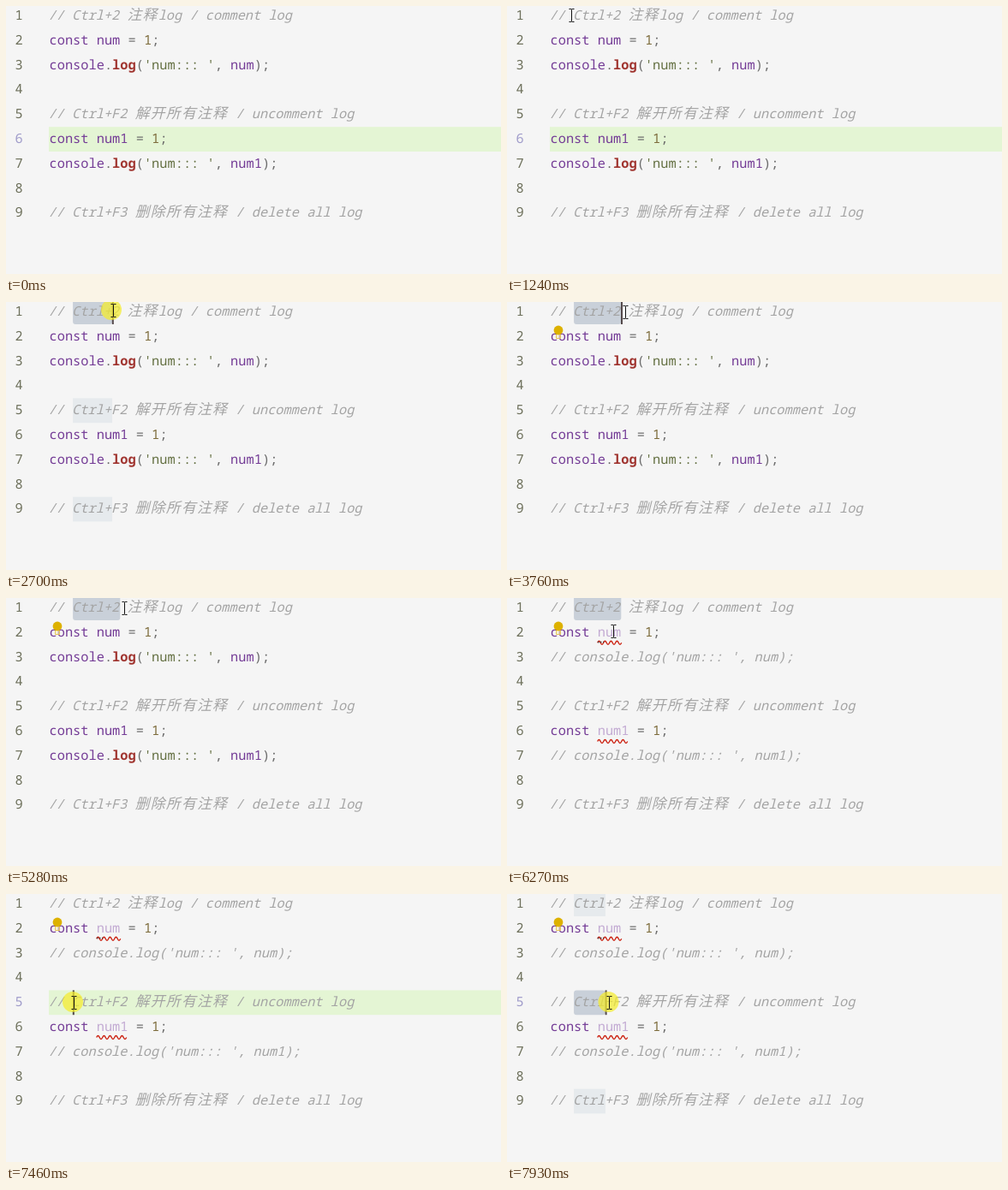
Animation of 578 by 313 pixels, one loop 8000 ms. Source, as an HTML page:

```html
<!DOCTYPE html>
<html lang="en">
<head>
<meta charset="utf-8">
<title>Editor: comment and uncomment logs</title>
<style>
  html, body { margin: 0; width: 100%; height: 100%; overflow: hidden; background: #f5f5f5; }
  svg { display: block; width: 578px; height: 313px; }
  text {
    font: 15.333px "Noto Sans Mono", "DejaVu Sans Mono", monospace;
    white-space: pre;
    text-rendering: geometricPrecision;
    fill: #6c6c6c;
  }
  .gutter { fill: #6d705b; }
  .gutter.active { fill: #a09cca; }
  .key, .name { fill: #743c96; }
  .unused { fill: #c3abd3; }
  .num { fill: #7d6c3c; }
  .str { fill: #647042; }
  .fn { fill: #a03530; font-weight: 700; }
  .note { fill: #a4a4a4; font-style: italic; font-weight: 500; }
  .han {
    font: italic 300 16.8px "Noto Sans CJK SC", "Noto Sans CJK", sans-serif;
    letter-spacing: 1.3px;
  }
</style>
</head>
<body>
<svg viewBox="0 0 578 313">
  <rect id="band" x="50" width="528" height="28.8" fill="#e4f5d4"/>
  <g id="marks"></g>
  <g id="code"></g>
  <g id="lint" fill="none" stroke="#cc2414" stroke-width="1.4"></g>
  <g id="bulb">
    <path d="M57.5 38V42.5H62.5V38" fill="#f7eec4" fill-opacity=".6" stroke="#e6c65a"/>
    <circle cx="60" cy="33" r="5.4" fill="#ddb100"/>
  </g>
  <rect id="caret" width="2" height="28.8" fill="#54494b"/>
  <circle id="press" r="12" fill="#f4ec2c" fill-opacity=".72"/>
  <path id="beam" fill="none" stroke="#111"
    d="M-3-7.5H-.8Q0-7.5 0-6.7V6.7Q0 7.5-.8 7.5H-3M3-7.5H.8Q0-7.5 0-6.7M0 6.7Q0 7.5.8 7.5H3"/>
</svg>
<script>
const LOOP = 8000, LEFT = 50.5, COL = 9.2, ROW = 28.8, TOP = -2.8, BASE = 16;
const COMMENTED = 5350, CLICK_1 = 1830, CLICK_5 = 7260;
const $ = id => document.getElementById(id);
const colX = c => LEFT + c * COL;
const rowY = r => TOP + r * ROW;

function add(parent, tag, attrs, content) {
  const el = document.createElementNS("http://www.w3.org/2000/svg", tag);
  for (const k in attrs) el.setAttribute(k, attrs[k]);
  if (content !== undefined) el.textContent = content;
  parent.appendChild(el);
  return el;
}
const set = (el, attrs) => { for (const k in attrs) el.setAttribute(k, attrs[k]); };
const show = (el, on) => { el.style.display = on ? "" : "none"; };

// Each line is a list of [class, text] runs; slanted lines start a little further left.
function addLine(row, runs) {
  const x = runs[0][0] === "note" ? LEFT - 1 : LEFT;
  const line = add($("code"), "text", { x, y: BASE + row * ROW });
  for (const [cls, str] of runs) add(line, "tspan", { class: cls }, str);
  return line;
}
const heading = (key, han, rest) =>
  [["note", `// ${key} `], ["note han", han], ["note", rest]];
const declare = (name, cls) =>
  [["key", "const "], [cls, name], ["", " = "], ["num", "1"], ["", ";"]];
const logCall = name =>
  [["name", "console"], ["", "."], ["fn", "log"], ["", "("], ["str", "'num::: '"],
   ["", ", "], ["name", name], ["", ");"]];

const gutter = Array.from({ length: 9 }, (_, r) =>
  add($("code"), "text", { x: 10.5, y: BASE + r * ROW, class: "gutter" }, r + 1));

addLine(0, heading("Ctrl+2", "注释", "log / comment log"));
addLine(4, heading("Ctrl+F2", "解开所有注释", " / uncomment log"));
addLine(8, heading("Ctrl+F3", "删除所有注释", " / delete all log"));

const before = [], after = [];
for (const [row, name] of [[1, "num"], [5, "num1"]]) {
  before.push(addLine(row, declare(name, "name")), addLine(row + 1, logCall(name)));
  after.push(addLine(row, declare(name, "unused")),
             addLine(row + 1, [["note", `// console.log('num::: ', ${name});`]]));
  const waves = Math.round(name.length * COL / 7);
  add($("lint"), "path", {
    d: `M${colX(6)} ${rowY(row) + 26.3}` + "q1.75-4 3.5 0t3.5 0".repeat(waves)
  });
}
add($("lint"), "path", { d: "M106 51.5h7", stroke: "#444", "stroke-dasharray": "1.5 1.5" });

const marks = [0, 4, 8].map(row =>
  add($("marks"), "rect", { x: colX(3), y: rowY(row), height: ROW }));

// Pointer path: time, x, y, ease-out power.
const path = [
  [70, 489, 308, 1], [820, 91.5, 18, 1.8], [1240, 75.5, 11, 1.5], [1830, 75.5, 11, 1],
  [2030, 79, 11, 1], [2230, 79, 11, 1], [2630, 125, 10, 1.2], [2760, 125, 10, 1],
  [3030, 138.5, 12, 1.4], [6200, 138.5, 12, 1], [6700, 73, 136.5, 1.6], [6910, 75.5, 135, 1],
  [7050, 77, 133, 1], [7120, 77, 133, 1], [7460, 79, 127, 1.4], [7610, 79, 127, 1],
  [7930, 119.5, 127, 1.2]
];
function pointer(t) {
  const i = path.findIndex(p => p[0] > t);
  if (i < 0) return path[path.length - 1].slice(1, 3);
  if (i === 0) return path[0].slice(1, 3);
  const a = path[i - 1], b = path[i];
  const p = 1 - Math.pow(1 - (t - a[0]) / (b[0] - a[0]), b[3]);
  return [a[1] + (b[1] - a[1]) * p, a[2] + (b[2] - a[2]) * p];
}

const blinks = [3300, 3760, 4290, 4750, 5280, 5740, 6270, 6800];
const dragColumn = x => Math.max(3, Math.floor((x - LEFT) / COL + 0.45));

function draw(t) {
  const [x, y] = pointer(t);
  const row = t < CLICK_1 ? 5 : t < CLICK_5 ? 0 : 4;
  const end = row === 5 || t < 2030 ? 3 : row === 0 && t >= 3030 ? 9 : dragColumn(x);
  const selecting = end > 3;

  show($("band"), !selecting);
  set($("band"), { y: rowY(row) });
  gutter.forEach((g, r) => g.classList.toggle("active", r === row && r > 0));

  marks.forEach((m, i) => {
    const own = i * 4 === row;
    // The longer text occurs only once, so it has no matches.
    show(m, selecting && (own || end < 9));
    set(m, { width: (end - 3) * COL, rx: own ? 3 : 0, fill: own ? "#c9d0d9" : "#e6eaed" });
  });

  const done = t >= COMMENTED;
  before.forEach(el => show(el, !done));
  after.forEach(el => show(el, done));
  show($("lint"), done);
  show($("bulb"), t >= 2970);

  const flips = blinks.filter(b => t >= b).length;
  show($("caret"), row !== 5 && (row === 4 || flips % 2 === 0));
  set($("caret"), { x: colX(end) - 0.3, y: rowY(row) });

  show($("press"), (t >= CLICK_1 && t < 3300) || t >= CLICK_5);
  set($("press"), { cx: x - (row === 4 ? 1 : 2), cy: y - 1 });

  // Whole-pixel steps keep the thin pointer crisp.
  show($("beam"), t >= 70);
  set($("beam"), { transform: `translate(${Math.floor(x) + 0.5} ${Math.round(y)})` });
}

const start = performance.now();
function tick() {
  draw((performance.now() - start) % LOOP);
  requestAnimationFrame(tick);
}
tick();
</script>
</body>
</html>
```
